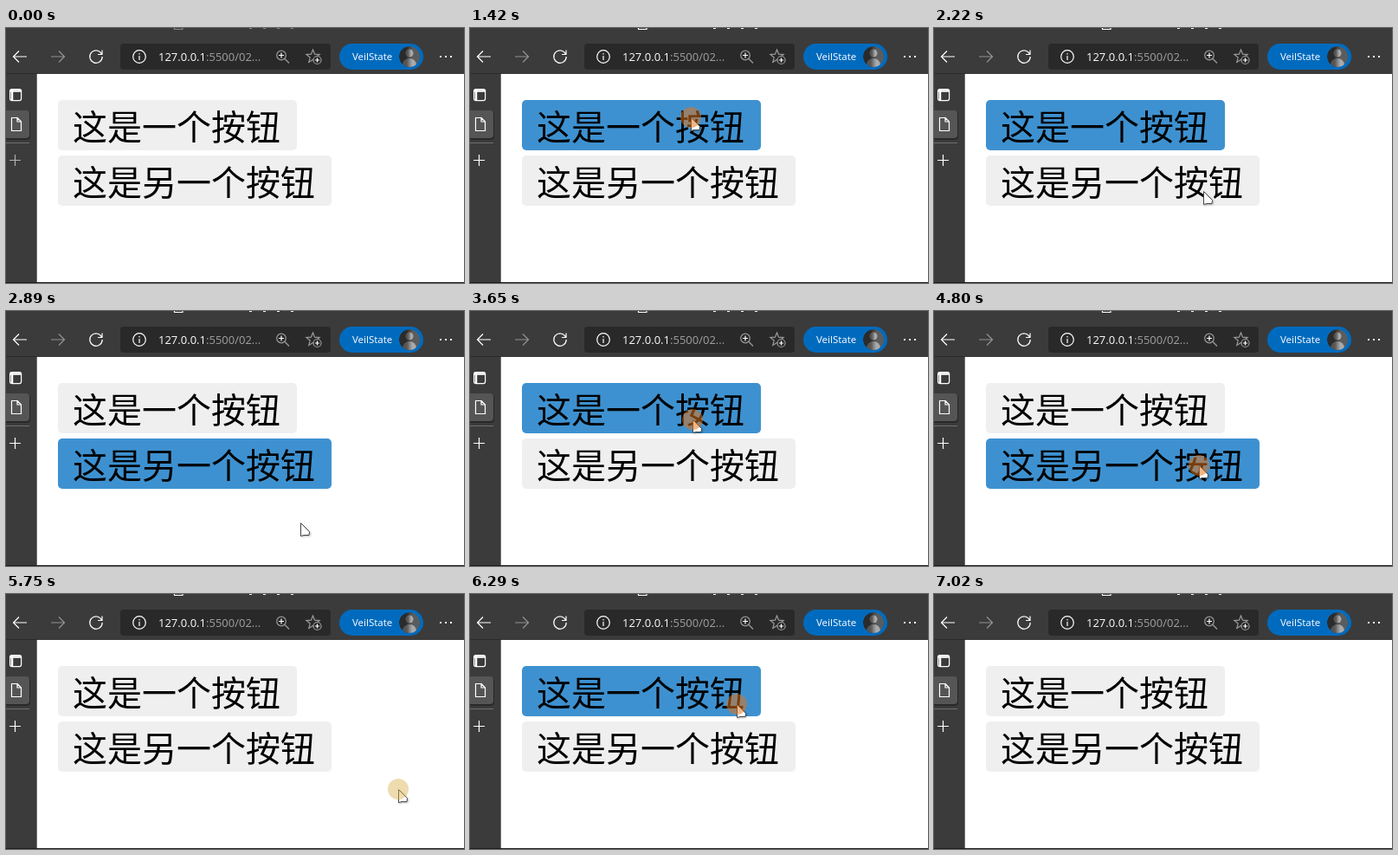
An HTML page for the animation above (7100 ms loop, 529x294 px).

```html
<!DOCTYPE html>
<html lang="zh">
<head>
<meta charset="utf-8">
<title>按钮</title>
<style>
  html, body { margin: 0; width: 100%; height: 100%; overflow: hidden; background: #3b3b3b; }
  svg { display: block; width: 529px; height: 294px; }
  .ui { font-family: "Open Sans", "Noto Sans", sans-serif; fill: #fff; }
  .label { font: 40px "Noto Sans CJK SC", "Noto Sans CJK", sans-serif; }
  .line { fill: none; stroke: #fff; stroke-width: 1.2; }
  .dim { stroke: #9a9a9a; }
</style>
</head>
<body>
<svg viewBox="0 0 529 294">
  <defs>
    <linearGradient id="portrait">
      <stop offset=".35" stop-color="#2b2b2b"/>
      <stop offset=".65" stop-color="#5c5c5c"/>
    </linearGradient>
    <linearGradient id="person">
      <stop offset=".3" stop-color="#555"/>
      <stop offset=".7" stop-color="#aaa"/>
    </linearGradient>
    <clipPath id="round"><circle r="12"/></clipPath>
    <path id="arrow" class="line" d="M8 0H-7.500m6.500-6.500l-6.500 6.500l6.500 6.500"/>
    <path id="cross" class="line" d="M-1 0H1M0-1V1" vector-effect="non-scaling-stroke"/>
  </defs>

  <rect width="529" height="294" fill="#3b3b3b"/>

  <!-- Title strip, cut off by the top edge -->
  <g id="title" class="line">
    <path d="M194.500 0V1.500H204V0"/>
    <path d="M281 .5H345" stroke-dasharray="3 13"/>
  </g>

  <!-- Toolbar -->
  <use href="#arrow" x="16" y="33"/>
  <use href="#arrow" transform="translate(60 33) scale(-1 1)" opacity=".45"/>
  <path class="line" d="M110.500 30a7.200 7.200 0 1 0 .7 3M111 25.500v5h-5"/>
  <rect x="132" y="18" width="243" height="30" rx="4" fill="#292929"/>
  <circle class="line" cx="154" cy="33" r="7.300"/>
  <path class="line" d="M154 32v5m0-8v1.500"/>
  <text class="ui" x="176" y="38" font-size="13">127.0.0.1<tspan fill="#a0a0a0">:5500/02...</tspan></text>
  <g class="line dim">
    <circle cx="318" cy="31.500" r="5.300"/>
    <path d="M322 35.500l5 5"/>
    <use href="#cross" class="dim" transform="translate(318 31.500) scale(3)"/>
    <path id="star"/>
    <circle cx="359.500" cy="37" r="4.500" fill="#292929"/>
    <use href="#cross" transform="translate(359.500 37) scale(2.500)"/>
  </g>
  <rect x="385" y="18" width="97" height="30" rx="15" fill="#006bbe"/>
  <text class="ui" x="400" y="37" font-size="11.500">VeilState</text>
  <g transform="translate(466 33)" clip-path="url(#round)">
    <circle r="12" fill="url(#portrait)"/>
    <circle cy="-4" r="4.500" fill="url(#person)"/>
    <circle cy="10" r="8" fill="url(#person)"/>
  </g>
  <path d="M501 33H516" stroke="#fff" stroke-width="2" stroke-dasharray="2 4"/>

  <!-- Sidebar -->
  <path d="M0 52.500H36" stroke="#2b2b2b"/>
  <rect class="line" x="4.600" y="70.600" width="13" height="13" rx="2"/>
  <path d="M5 72.500h12.500M7 71v12" stroke="#fff" stroke-width="2.500"/>
  <rect x="-5" y="96" width="33" height="33" rx="4" fill="#292929"/>
  <rect x="-5" y="95" width="32" height="32" rx="4" fill="#555"/>
  <path class="line" stroke-linejoin="round" d="M13 103.500H6.500v15h11V108l-4.500-4.500V108h4.500"/>
  <path d="M0 132.500H27" stroke="#707070"/>
  <use id="plus" href="#cross" transform="translate(10.500 152.500) scale(6.500)"/>

  <!-- Page -->
  <rect x="36" y="53" width="493" height="240" fill="#fff"/>
  <path d="M35.500 53V293" stroke="#707070"/>
  <path d="M0 293.500H529" stroke="#1c1c1c"/>
  <rect id="first" x="60" y="83" width="276" height="58" rx="5"/>
  <text class="label" x="77" y="129">这是一个按钮</text>
  <rect id="second" x="60" y="147" width="316" height="58" rx="5"/>
  <text class="label" x="77" y="193">这是另一个按钮</text>

  <g id="cursor">
    <path d="M.5 .5v15l3.500-1h6l.5-4z" fill="#fff" stroke="#444" style="filter: drop-shadow(1px 1px 1px #0004)"/>
    <circle id="press" r="12"/>
  </g>
</svg>
<script>
const LOOP = 7100, RESET = 7020, EXIT = 6430;
const MOVE = 180, HOLD = 200;
const el = id => document.getElementById(id);

// Each stop: when the pointer sets off, where it goes, what it clicks on arrival.
const start = { x: 397, y: 172 };
const stops = [
  { at: 460, x: 267, y: 94 },
  { at: 1100, x: 255, y: 103, click: "first" },
  { at: 1510, x: 327, y: 178 },
  { at: 1900, x: 311, y: 188 },
  { at: 2300, x: 313, y: 187, click: "second" },
  { at: 2720, x: 340, y: 244, click: "page" },
  { at: 3280, x: 257, y: 125, click: "first" },
  { at: 3680, x: 325, y: 221 },
  { at: 3920, x: 299, y: 173 },
  { at: 4450, x: 306, y: 178, click: "second" },
  { at: 4980, x: 435, y: 232 },
  { at: 5550, x: 453, y: 225, click: "page" },
  { at: 5920, x: 301, y: 123, click: "first" },
  { at: 6270, x: 500, y: 239 }
];

const ease = k => k * k * (3 - 2 * k);
const mix = (a, b, k) => Math.round(a + (b - a) * k);

function drawStar() {
  const points = Array.from({ length: 10 }, (_, i) => {
    const angle = i * Math.PI / 5, radius = i % 2 ? 3.5 : 8;
    return [354.5 + radius * Math.sin(angle), 33 - radius * Math.cos(angle)];
  });
  el("star").setAttribute("d", `M${points.join("L")}Z`);
}

function draw() {
  const t = performance.now() % LOOP;

  const i = stops.findLastIndex(s => s.at <= t);
  el("cursor").style.display = i >= 0 && t < EXIT ? "" : "none";
  if (i >= 0) {
    const from = stops[i - 1] || start, to = stops[i];
    const k = ease(Math.min(1, (t - to.at) / MOVE));
    el("cursor").setAttribute("transform", `translate(${mix(from.x, to.x, k)} ${mix(from.y, to.y, k)})`);
  }

  const clicked = stops.findLast(s => s.click && s.at + MOVE <= t);
  const focus = t < RESET && clicked?.click;
  for (const id of ["first", "second"])
    el(id).setAttribute("fill", focus === id ? "#3e91d0" : "#efefef");
  el("press").style.display = clicked && t < clicked.at + MOVE + HOLD ? "" : "none";
  el("press").setAttribute("fill", focus === "page" ? "rgba(217,177,77,.45)" : "rgba(225,115,25,.53)");

  // The window brightens once it has been clicked.
  el("title").style.opacity = clicked ? 1 : .4;
  el("plus").style.opacity = clicked ? 1 : .6;
  requestAnimationFrame(draw);
}

drawStar();
draw();
</script>
</body>
</html>
```
